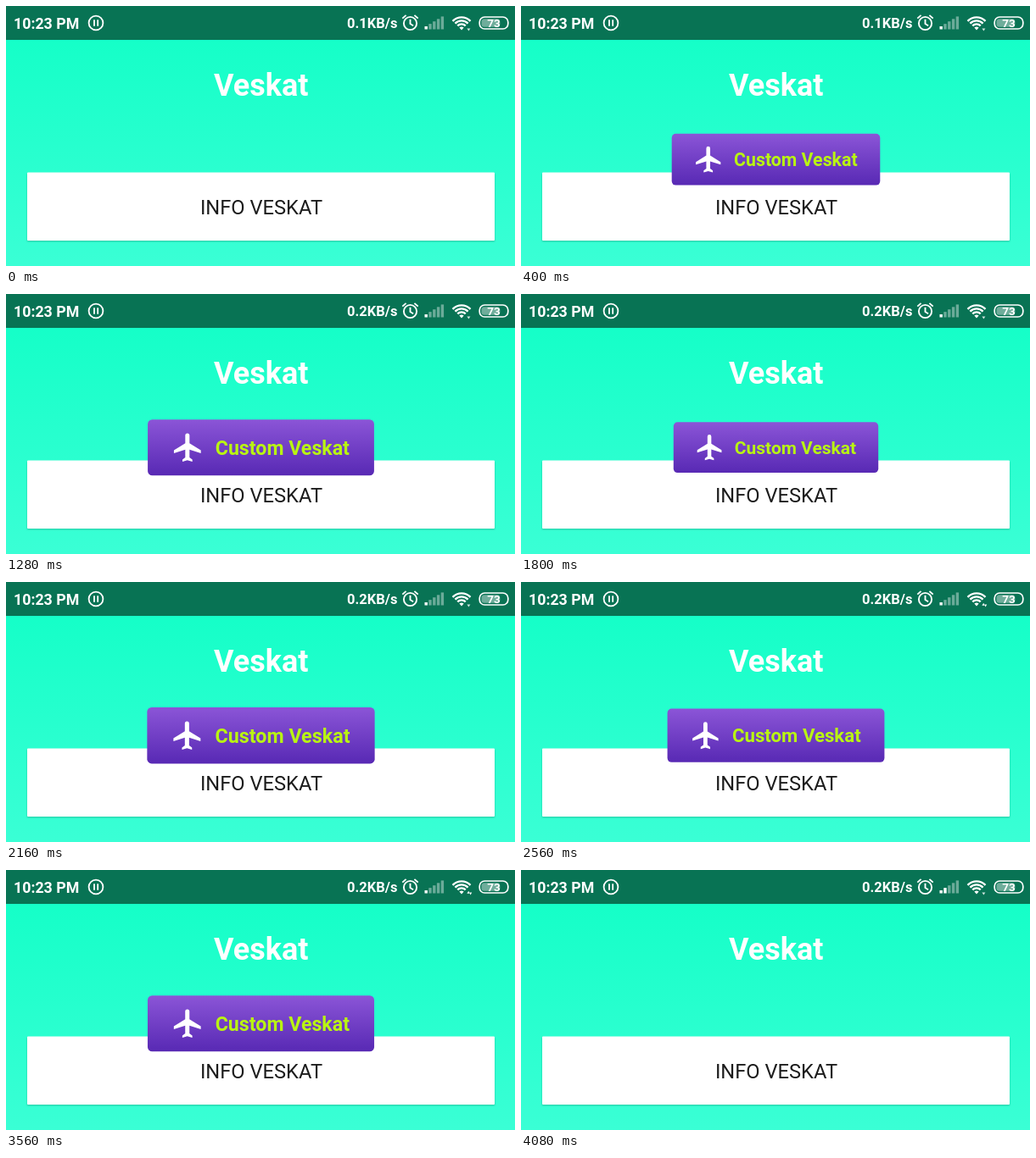
Recreate the animation shown at these times as an HTML page. Size 600 px wide and 307 px high, loop 4720 ms.

```html
<!DOCTYPE html>
<html lang="en">
<head>
<meta charset="utf-8">
<title>Toast demo</title>
<style>
  html, body { margin: 0; width: 100%; height: 100%; overflow: hidden; }
  svg { display: block; width: 100vw; height: 100vh; font-family: Roboto, sans-serif; }
  .mid { text-anchor: middle; }
  .bold { font-weight: 700; }
</style>
</head>
<body>
<svg viewBox="0 0 600 307" preserveAspectRatio="none">
  <defs>
    <linearGradient id="sky" x2="0" y2="1">
      <stop stop-color="#15ffc8"/>
      <stop offset="1" stop-color="#3affd5"/>
    </linearGradient>
    <linearGradient id="violet" x2="0" y2="1">
      <stop stop-color="#8b55d7"/>
      <stop offset="1" stop-color="#5829b4"/>
    </linearGradient>
    <filter id="soft" x="-5%" y="-20%" width="110%" height="140%">
      <feGaussianBlur stdDeviation="1.3"/>
    </filter>
  </defs>

  <rect y="40" width="600" height="267" fill="url(#sky)"/>
  <rect width="600" height="40" fill="#087354"/>

  <g id="status" fill="#fff">
    <text class="bold" x="9" y="26.7" font-size="17.8">10:23 PM</text>
    <g fill="none" stroke="#fff" stroke-width="1.8">
      <circle cx="106" cy="20" r="8.4"/>
      <path d="M104 16.2v7.6M108.2 16.2v7.6"/>
    </g>
    <text id="speed" class="bold" x="402" y="26.4" font-size="16.5">0.1KB/s</text>
    <g fill="none" stroke="#fff" stroke-width="1.9">
      <circle cx="476.5" cy="20.5" r="7.6"/>
      <path d="M476.5 15.8v5.2l3.6 2.2M467.3 14.6l4.3-3.7M485.7 14.6l-4.3-3.7"/>
    </g>
    <g id="bars"></g>
    <g id="wifi" fill="none" stroke="#fff" stroke-width="2.4"></g>
    <path d="M537 28.5l-2.6-3a4 4 0 0 1 5.2 0z"/>
    <path id="down" d="M543.4 26.5h4l-2 3z"/>
    <path id="up" d="M543.4 27.8h3.6l-1.8-3zM546 26.5h3.2l-1.6 3z"/>
    <rect x="558.2" y="13" width="33.6" height="14" rx="6" fill="none" stroke="#fff" stroke-width="1.7"/>
    <rect x="560.4" y="15.2" width="22" height="9.6" rx="3.5" fill-opacity=".42"/>
    <text class="mid bold" x="575" y="25" font-size="13.5">73</text>
  </g>

  <text class="mid bold" x="300.8" y="106" font-size="36" fill="#fff">Veskat</text>

  <rect x="25" y="198" width="551" height="80" fill="#087354" opacity=".4" filter="url(#soft)"/>
  <rect x="25" y="196.5" width="551" height="80.5" rx="1" fill="#fff"/>
  <text class="mid" x="301" y="246" font-size="23.7" fill="#1c1c1c">INFO VESKAT</text>

  <g id="toast" opacity="0">
    <rect x="-127.75" y="-31.6" width="255.5" height="63.2" rx="5" fill="url(#violet)"/>
    <path transform="translate(-83 0) scale(1.6) translate(-11.5 -12)" fill="#fff"
      d="M21 16v-2l-8-5V3.5a1.5 1.5 0 0 0-3 0V9l-8 5v2l8-2.5V19l-2 1.5V22l3.5-1 3.5 1v-1.5L13 19v-5.5z"/>
    <text class="bold" x="-51.5" y="8.2" font-size="22.2" fill="#b9f512">Custom Veskat</text>
  </g>
</svg>
<script>
const LOOP = 4720, STEP = 40;
const PULSE = { start: 280, period: 1142, cycles: 3, depth: 0.063 };
const NS = 'http://www.w3.org/2000/svg';
const $ = id => document.getElementById(id);
const clamp = v => Math.max(0, Math.min(1, v));

function add(parent, tag, attrs) {
  const el = document.createElementNS(NS, tag);
  for (const key in attrs) el.setAttribute(key, attrs[key]);
  return parent.appendChild(el);
}

const bars = [0, 1, 2, 3, 4].map(i => {
  const h = 3.5 + i * 2.9;
  return add($('bars'), 'rect', { x: 493.5 + i * 4.8, y: 27.5 - h, width: 3.4, height: h });
});

for (const r of [6.6, 10.6, 14.6]) {
  const dx = r * Math.sin(0.8), y = 28 - r * Math.cos(0.8);
  add($('wifi'), 'path', { d: `M${537 - dx} ${y}A${r} ${r} 0 0 1 ${537 + dx} ${y}` });
}

function draw(t) {
  const turns = Math.max(0, Math.min(PULSE.cycles, (t - PULSE.start) / PULSE.period));
  const scale = 1 - PULSE.depth * Math.sin(2 * Math.PI * turns);
  const fadeIn = clamp(t / 120), fadeOut = clamp((4080 - t) / 280);
  $('toast').setAttribute('transform', `translate(300.5 181.2) scale(${scale})`);
  $('toast').setAttribute('opacity', Math.min(fadeIn, fadeOut));

  $('speed').textContent = t < 1000 ? '0.1KB/s' : '0.2KB/s';
  const busy = t >= 2240 && t < 3760;
  $('up').setAttribute('opacity', busy ? 1 : 0);
  $('down').setAttribute('opacity', busy ? 0 : 0.8);
  const strength = t >= 3760 ? 2 : 1;
  bars.forEach((bar, i) => bar.setAttribute('opacity', i < strength ? 1 : 0.4));
}

const began = performance.now();
function tick() {
  const t = (performance.now() - began) % LOOP;
  draw(Math.floor(t / STEP) * STEP);
  requestAnimationFrame(tick);
}
tick();
</script>
</body>
</html>
```
